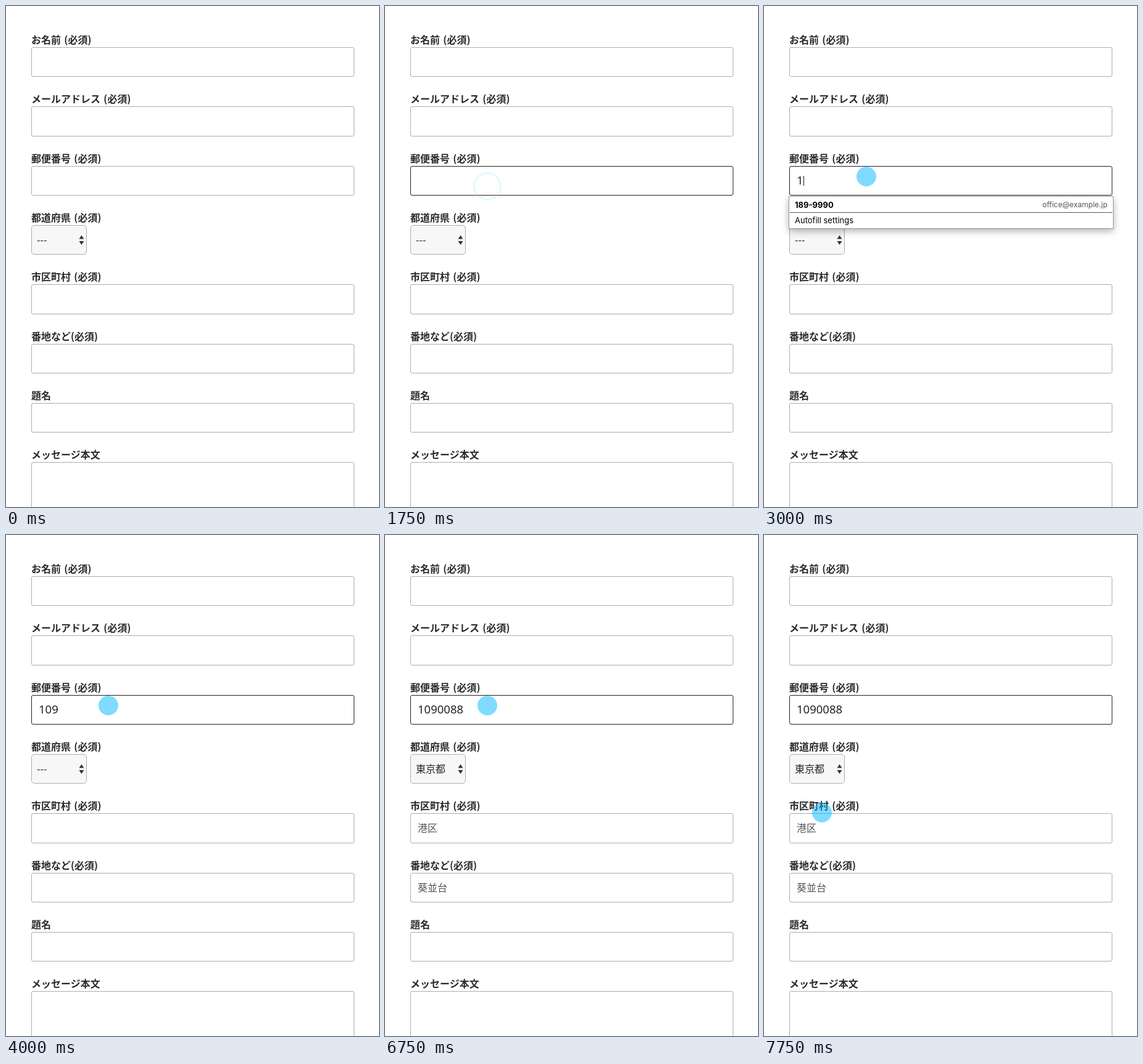
Animation of 605 by 814 pixels, one loop 8 s. Source, as an HTML page:

```html
<!DOCTYPE html>
<html lang="ja">
<head>
<meta charset="utf-8">
<title>Postal code form</title>
<style>
  html, body { margin: 0; width: 100%; height: 100%; overflow: hidden; background: #fff; }
  svg { display: block; width: 605px; height: 814px; }
  text { font: 16px "Noto Sans CJK JP", "Noto Sans CJK", sans-serif; fill: #555; white-space: pre; }
  .label { font-weight: 700; fill: #2b2b2b; word-spacing: 1.7px; }
  .box { fill: #fff; stroke: #adadad; }
  .dark { fill: #222; }
  .digits { font: 18.5px "Noto Sans", sans-serif; fill: #222; }
  .popup text { font: 13px Inter, sans-serif; fill: #000; }
  .popup .code { font-weight: 700; }
  .popup .mail { font-size: 12px; fill: #555; text-anchor: end; }
  .panel { fill: #fff; stroke: #999; filter: drop-shadow(0 4px 6px rgba(0, 0, 0, .3)); }
</style>
</head>
<body>
<svg viewBox="0 0 605 814">
  <g id="form"></g>
  <path d="M118.5 378.5l4-6 4 6zM118.5 382h8l-4 6z" fill="#333"/>
  <text id="prefecture" class="dark" x="50" y="386"></text>
  <g id="address">
    <text x="53" y="482">港区</text>
    <text x="53" y="579">葵並台</text>
  </g>
  <text id="postal" class="digits" x="53" y="290"></text>
  <rect id="caret" y="276" width="1" height="16" fill="#111"/>
  <g id="popup" class="popup">
    <rect class="panel" x="40.5" y="309.5" width="526" height="52"/>
    <path d="M42 335.5H565" stroke="#555"/>
    <text class="code" x="50" y="328">189-9990</text>
    <text class="mail" x="557" y="327">office@example.jp</text>
    <text x="50" y="353">Autofill settings</text>
  </g>
  <circle id="ring" fill="none" stroke="#7fdbff" stroke-width="3"/>
  <circle id="dot" r="16" fill="#00b7ff" fill-opacity=".5"/>
</svg>
<script>
const $ = id => document.getElementById(id);
const LOOP = 8000, STEP = 250, BLINK = 500;
const ENTER = 250, CLICK = 1250, RELEASE = 2000, FILL = 6750, LEAVE = 7000;
const KEYS = [3000, 3250, 3500, 5250, 5500, 6000, 6000];
const CODE = "1090088", DIGIT = 10.55;
const LABELS = ["お名前 (必須)", "メールアドレス (必須)", "郵便番号 (必須)", "都道府県 (必須)",
  "市区町村 (必須)", "番地など(必須)", "題名", "メッセージ本文"];

$("form").innerHTML = LABELS.map((label, i) => {
  const top = 67 + 96.3 * i, y = Math.round(top);
  const isSelect = label.startsWith("都道府県"), isMessage = label.startsWith("メッセージ");
  const height = isMessage ? 120 : Math.round(top + 48.4) - y - 1;
  return `<text class="label" x="41" y="${y - 6}">${label}</text>
    <rect id="box${i}" class="box" x="41.5" y="${y + .5}" height="${height}"
      width="${isSelect ? 89 : 523}" rx="${isSelect ? 4.5 : 2.5}"
      ${isSelect ? 'style="fill:#f7f7f7"' : ""}/>`;
}).join("");

const clamp = v => Math.min(1, Math.max(0, v));
const bezier = (a, b, c, q) => a * (1 - q) ** 2 + 2 * b * q * (1 - q) + c * q * q;
const show = (id, on) => $(id).setAttribute("visibility", on ? "visible" : "hidden");
const set = (id, attrs) => {
  for (const name in attrs) $(id).setAttribute(name, attrs[name]);
};

// Curves in, rests on the field, then slows down towards the filled address.
function pointerAt(t) {
  if (t >= LEAVE) {
    const left = 1 - clamp((t - LEAVE) / 750);
    return [94 + 77 * left ** 1.5, 451 - 53 * left ** 2.5];
  }
  if (t > CLICK) return [166, 277];
  const q = clamp((t - ENTER) / 500);
  return [bezier(188, 187, 178, q), bezier(274, 285, 272, q)];
}

// The blink restarts at each key; filling the address restarts it unlit.
function caretLit(t, typed) {
  const start = t >= FILL ? FILL - BLINK : typed ? KEYS[typed - 1] : CLICK;
  return t >= CLICK && Math.floor((t - start) / BLINK) % 2 === 0;
}

function render(time) {
  const t = Math.floor(time % LOOP / STEP) * STEP;
  const typed = KEYS.filter(key => key <= t).length;
  const [x, y] = pointerAt(t);
  const clicking = t >= CLICK && t < RELEASE;
  const age = (t - CLICK) / STEP;

  $("box2").style.stroke = t >= CLICK ? "#222" : "";
  $("postal").textContent = CODE.slice(0, typed);
  $("prefecture").textContent = t >= FILL ? "東京都" : "---";
  set("caret", { x: Math.round(53 + DIGIT * typed) });
  show("caret", caretLit(t, typed));
  show("address", t >= FILL);
  show("popup", typed === 1);

  set("dot", { cx: x, cy: y });
  show("dot", t >= ENTER && !clicking);
  show("ring", clicking);
  if (clicking) set("ring", { cx: x, cy: y + 16, r: 19.5 + age * age / 2, "stroke-opacity": 1 - .4 * age });
}

const begin = performance.now();
function frame() {
  render(performance.now() - begin);
  requestAnimationFrame(frame);
}
frame();
</script>
</body>
</html>
```
